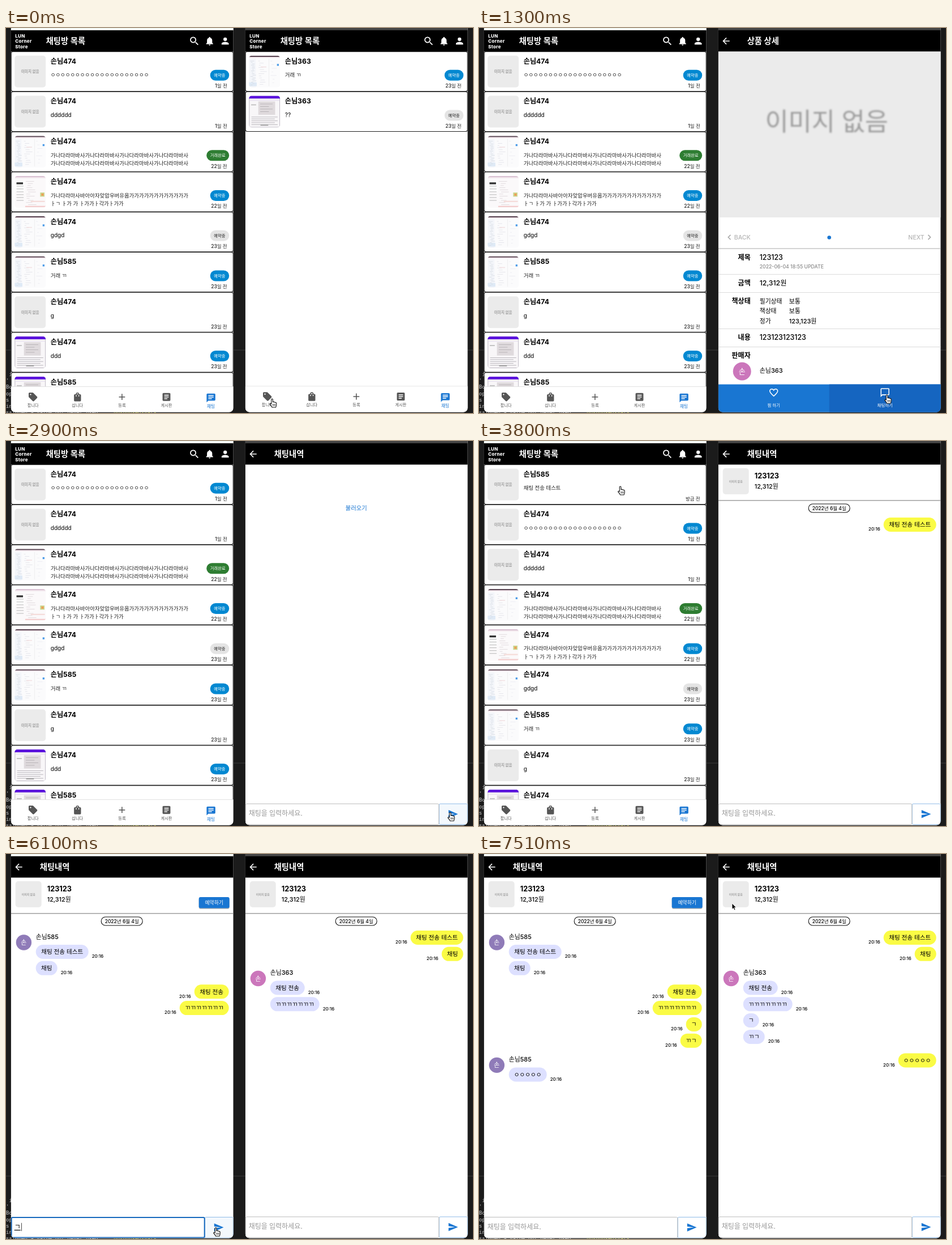
These frames come from a looping animation (825x679 px, 7.61 s). An HTML page:

```html
<!DOCTYPE html>
<html lang="ko">
<head>
<meta charset="utf-8">
<style>
html, body { margin: 0; width: 100%; height: 100%; overflow: hidden; background: #1b1b1b; }
svg { display: block; font-weight: 450; }
text { font-family: Inter, "Noto Sans CJK KR", "Noto Sans CJK", sans-serif; white-space: pre; }
.mono { font-family: "DejaVu Sans Mono", monospace; }
</style>
</head>
<body>
<svg id="stage" width="825" height="679" viewBox="0 0 825 679"></svg>
<script>
const LOOP = 7610, BLUE = '#1976d2', TOP = 41.6;
const BOLD = ' font-weight="700"', MID = ' text-anchor="middle"', END = ' text-anchor="end"';
const fill = c => ` fill="${c}"`;
const text = (x, y, s, size, o = '') => `<text x="${x}" y="${y}" font-size="${size}"${o}>${s}</text>`;
const rect = (x, y, w, h, c, rx = 0, o = '') =>
  `<rect x="${x}" y="${y}" width="${w}" height="${h}" rx="${rx}" fill="${c}" ${o}/>`;
const stroke = (c, w = 1) => `stroke="${c}" stroke-width="${w}"`;
const circle = (x, y, r, c) => `<circle cx="${x}" cy="${y}" r="${r}" fill="${c}"/>`;
const path = (d, o) => `<path d="${d}" ${o}/>`;
const move = (x, y, s) => `<g transform="translate(${x} ${y})">${s}</g>`;
const rowsOf = (n, f) => Array.from({ length: n }, (_, i) => f(i)).join('');

// Icons on a 24 unit grid: [path, stroke width or 0 for filled]
const ICONS = {
  search: ['M14.500 14.500L20 20M15 9.500A5.500 5.500 0 1 1 4 9.500 5.500 5.500 0 0 1 15 9.500Z', 2.1],
  bell: ['M12 22a2 2 0 0 0 2-2h-4a2 2 0 0 0 2 2zM18 16v-5c0-3-1.600-5.600-4.500-6.300V4a1.500 1.500 0 0 0-3 0v.7C7.600 5.400 6 8 6 11v5l-2 2v1h16v-1z', 0],
  person: ['M12 12a4 4 0 1 0 0-8 4 4 0 0 0 0 8zM12 14c-2.700 0-8 1.300-8 4v2h16v-2c0-2.700-5.300-4-8-4z', 0],
  sell: ['M21.400 11.400L12.600 2.600Q12 2 11.200 2H4Q2 2 2 4v7.200q0 .8.6 1.400l8.800 8.800q1.400 1.200 2.800 0l7.200-7.200q1.200-1.400 0-2.800zM6.500 8a1.500 1.500 0 1 1 0-3 1.500 1.500 0 0 1 0 3z', 0],
  bag: ['M18 6h-2a4 4 0 0 0-8 0H6Q4 6 4 8v12q0 2 2 2h12q2 0 2-2V8q0-2-2-2zM10 10q-1 2-2 0V8h2zM12 4q2 0 2 2h-4q0-2 2-2zM16 10q-1 2-2 0V8h2z', 0],
  add: ['M12 5v14M5 12h14', 2],
  board: ['M5 3h14q2 0 2 2v14q0 2-2 2H5q-2 0-2-2V5q0-2 2-2zM7 7v2h10V7zM7 11v2h10v-2zM7 15v2h7v-2z', 0],
  chat: ['M4 2h16q2 0 2 2v12q0 2-2 2H6l-4 4V4q0-2 2-2zM6 5.500v2h12v-2zM6 9v2h12V9zM6 12.500v2h8v-2z', 0],
  bubble: ['M3 20V4q0-1 1-1h16q1 0 1 1v12q0 1-1 1H6z', 2],
  heart: ['M12 20C5 14 3 11.500 3 8.500 3 6 5 4 7.500 4 9.300 4 11 5 12 6.700 13 5 14.700 4 16.500 4 19 4 21 6 21 8.500c0 3-2 5.500-9 11.500z', 2],
  back: ['M20 12H5.500M12.500 4.500L5 12l7.500 7.500', 2],
  left: ['M15 6.500L9.500 12l5.500 5.500', 2.2],
  right: ['M9 6.500l5.500 5.500L9 17.500', 2.2],
  send: ['M2 21L23 12 2 3v7l15 2-15 2z', 0]
};
function icon(name, x, y, size, color) {
  const [d, w] = ICONS[name], k = size / 24;
  const paint = w ? `fill="none" ${stroke(color, w)}` : `fill="${color}" fill-rule="evenodd"`;
  return `<g transform="translate(${x - size / 2} ${y - size / 2}) scale(${k})">${path(d, paint)}</g>`;
}

// Thumbnails in a 100 x 100 box
function noise(seed) {
  return () => (seed = seed * 16807 % 2147483647) / 2147483647;
}
function lines(n, x, w, color, seed) {
  const rnd = noise(seed);
  return rowsOf(n, i => rect(x + rnd() * 8, 16 + i * 80 / n, w * (.2 + .7 * rnd()), 1.6, color));
}
const PICS = {
  code: () => rect(0, 0, 100, 100, '#fbfbfc') + rect(0, 0, 100, 4, '#57424f') + rect(0, 4, 100, 3, '#f0e3e9') +
    rect(0, 10, 22, 90, '#f4f6fa') + rect(0, 84, 25, 12, '#dfeaf6') + lines(18, 4, 15, '#d8dde5', 7) +
    lines(12, 30, 24, '#e4e4ea', 23) + rect(64, 10, 1, 86, '#e4e4e4') + lines(7, 69, 22, '#ececf2', 31) +
    rect(90, 26, 6, 6, '#4b9be8') + rect(38, 34, 18, 3, '#f3e2e4'),
  memo: () => rect(0, 0, 100, 100, '#fbf9fa') + rect(0, 0, 100, 4, '#d9c2d2') + rect(0, 4, 100, 3, '#f1e6ec') +
    rect(3, 18, 28, 32, '#fff') + rect(6, 20, 21, 6, '#333') + rowsOf(6, i => rect(6, 31 + i * 9, 23, 1.5, '#aaa')) +
    lines(12, 36, 40, '#dfd8dc', 5) + rect(82, 52, 14, 13, '#c9d891') + rect(86, 55, 7, 7, '#ef9c55') +
    rect(52, 78, 45, 4, '#f5dcd9') + rect(34, 94, 66, 4, '#f3cccc'),
  form: () => rect(0, 0, 100, 100, '#bdb8c2') + rect(0, 0, 100, 9, '#5b13dd') + rect(2, 9, 96, 89, '#f8f6f8') +
    rect(2, 12, 96, 4, '#ece6f1') + rect(30, 18, 54, 42, '#dfdadd') + rowsOf(4, i => rect(36, 25 + i * 8, 40 - i % 2 * 12, 1.6, '#b5b0b4')) +
    rect(7, 27, 16, 3, '#bbb') + rowsOf(5, i => rect(8, 66 + i * 6, 84 - i % 2 * 9, 1.6, '#b3b0b6')) + rect(37, 91, 25, 3, '#999'),
  dark: () => rect(0, 0, 100, 100, '#1c2c33') + rect(0, 0, 100, 4, '#583777') + rect(0, 4, 100, 3, '#303c43') +
    rect(0, 7, 17, 93, '#17242b') + lines(16, 2, 12, '#2c3c44', 9) + lines(19, 22, 34, '#33494f', 44) +
    lines(12, 65, 26, '#2d444b', 17) + rect(17, 72, 83, 1, '#36484f'),
  cal: () => rect(0, 0, 100, 100, '#fff') + text(3, 11, '2022', 6) + rowsOf(6, i => rect(0, 20 + i * 15, 100, .6, '#e6e6e6')) +
    rowsOf(6, i => rect(14 + i * 14, 15, .6, 85, '#f0f0f0')) + rowsOf(24, i => rect(6 + i % 7 * 14, 24 + (i / 7 | 0) * 17, 3, 2, i % 5 ? '#bbb' : '#8aacd8')) +
    rect(78, 13, 5, 5, '#ef8f8b')
};
const NO_IMAGE = '이미지 없음';
function thumb(kind, x, y, w, h, size) {
  if (!kind) return rect(x, y, w, h, '#ebebeb', 5) +
    text(x + w / 2, y + h / 2 + size * .36, NO_IMAGE, size, BOLD + MID + fill('#a0a0a0'));
  return `<g transform="translate(${x} ${y}) scale(${w / 100} ${h / 100})" style="clip-path:inset(0 round 9px)">${PICS[kind]()}</g>`;
}

function header(title, back) {
  const bar = rect(0, 4, 393, TOP - 4, '#000');
  const name = x => text(x, 28, title, 14.3, fill('#fff') + ' font-weight="600"');
  if (back) return bar + icon('back', 14, 23, 18, '#fff') + name(51);
  return bar + ['LUN', 'Corner', 'Store'].map((s, i) => text(7.5, 16.700 + i * 9.400, s, 8, fill('#fff') + ' font-weight="800" letter-spacing=".3"')).join('') +
    name(62) + icon('search', 324, 23, 20, '#fff') + icon('bell', 351, 23, 18.5, '#fff') + icon('person', 378.5, 23, 19, '#fff');
}

const TABS = [['sell', '팝니다'], ['bag', '삽니다'], ['add', '등록'], ['board', '게시판'], ['chat', '채팅']];
function nav(active, dy) {
  return move(0, dy, rect(0, 632, 393, 1, '#e2e2e2') + rect(0, 633, 393, 50, '#fff') + TABS.map(([name, label], i) => {
    const x = 39 + i * 78.6, on = i === active, c = on ? BLUE : '#555';
    return icon(name, x, on ? 652.5 : 650.7, 18.5, c) + text(x, on ? 669.8 : 667.6, label, on ? 7.7 : 7.2, MID + fill(c));
  }).join(''));
}

const BADGES = { blue: ['예약중', '#0288d1', '#fff'], gray: ['예약중', '#e4e4e4', '#222'], done: ['거래완료', '#2e7d32', '#fff'] };
function badge(kind, right, y) {
  if (!kind) return '';
  const [s, bg, fg] = BADGES[kind], w = kind === 'done' ? 40 : 33.5;
  return rect(right - w, y - 9.5, w, 19, bg, 9.5) + text(right - w / 2, y + 2.7, s, 7.3, MID + fill(fg));
}
const card = (y, h) => rect(.5, y, 392, h - .6, '#fff', 3, stroke('#222', 1.1));

const ANN = '손님363', BEN = '손님474', CAT = '손님585', GA = '가나다라마바사'.repeat(4);
const ROOMS = [
  [BEN, '', ['ㅇ'.repeat(20)], 'blue', '1일 전'],
  [BEN, '', ['dddddd'], '', '1일 전'],
  [BEN, 'code', [GA, GA], 'done', '22일 전'],
  [BEN, 'memo', ['가나다라마사바아아자앚압우버유옵' + '가'.repeat(12), 'ㅏㄱ ㅏ가 가 ㅏ가가ㅏ각가ㅏ가가'], 'blue', '22일 전'],
  [BEN, 'code', ['gdgd'], 'gray', '23일 전'],
  [CAT, 'code', ['거래 ㄲ'], 'blue', '23일 전'],
  [BEN, '', ['g'], '', '23일 전'],
  [BEN, 'form', ['ddd'], 'blue', '23일 전'],
  [CAT, 'form', ['ddd'], 'blue', '23일 전']
];
const NEW_ROOM = [CAT, '', ['채팅 전송 테스트'], '', '방금 전'];
const BUYER_ROOMS = [[ANN, 'code', ['거래 ㄲ'], 'blue', '23일 전'], [ANN, 'form', ['??'], 'gray', '23일 전']];
function roomList(rooms, dy) {
  return rooms.map(([name, pic, msg, tag, when], i) => move(0, TOP + i * 70.75,
    card(0, 70.75) + thumb(pic, 6.5, 7.2, 55, 56, 6.6) + text(70, 21, name, 12.2, BOLD) +
    msg.map((s, j) => text(70, 44.8 + j * 14.5, s, /[a-z?]/.test(s) ? 10 : 9.45, fill('#222'))).join('') +
    badge(tag, 385.5, 41.6) + text(382, 63.6, when, 8.5, END + fill('#222')))).join('') +
    header('채팅방 목록') + nav(4, dy);
}

const ITEMS = [
  ['', ['123123'], '', '12,312원', '1시간 전'],
  ['', ['등록 글 수정 테스트'], '', '10,000원', '2시간 전'],
  ['dark', ['asdasd'], '캡스톤디자인II / 류담혁', '20,000원', '2시간 전'],
  ['cal', ['123123'], '영어회화 / 노아린벨크', '123,123원', '3시간 전'],
  ['dark', ['팝니다 등록 테스트'], '캡스톤디자인II / 류담혁', '20,000원', '3시간 전'],
  ['', ['ㅇ'.repeat(24), 'ㅇ'.repeat(19)], '글로벌비즈니스영어 / 맹솔찬', '21,212원', '22일 전'],
  ['memo', ['이미지도 올리고 수정'], '전공탐색과생애설... / 유키네하루', '2,222원', '22일 전', 'gray']
];
function market(tip) {
  return ITEMS.map(([pic, title, course, price, when, tag], i) => move(0, TOP + i * 85.2,
    card(0, 85.2) + thumb(pic, 4.5, 4.8, 79.5, 76, 10) +
    title.map((s, j) => text(93, 19.1 + j * 16.5, s, 10.9)).join('') +
    (course && rect(89, 47.3, 42, 15, '#e4e4e4', 7.5) + text(110, 57.5, '대학', 7.2, MID) + text(135, 57.9, course, 8.4)) +
    text(93, 76.5, price, 13.8, BOLD) + text(383, 76.8, when, 8.7, END + fill('#666')) +
    icon('heart', 375, 16.8, 19, '#444') + badge(tag, 385, 55))).join('') +
    header('팝니다') + nav(0, -.7) +
    (tip ? rect(0, 660.5, 113, 20, '#202124', 2) + text(4, 672, 'innerhome:4100/unit/27', 9, fill('#ddd')) : '');
}

function detail(hover) {
  const label = (y, s) => text(57, y, s, 12, BOLD + END);
  const rule = (y, c = '#dcdcdc') => rect(0, y, 393, 1, c);
  const action = (x, name, s) => icon(name, x, 643, 18.5, '#fff') + text(x, 667.7, s, 7.4, MID + fill('#fff'));
  const facts = [['필기상태', '보통'], ['책상태', '보통'], ['정가', '123,123원']];
  return header('상품 상세', true) + rect(0, TOP, 393, 334 - TOP, '#ebebeb') +
    text(191.5, 181, NO_IMAGE, 44.7, MID + fill('#9c9c9c') + ' font-weight="500" style="filter:blur(1.6px)"') +
    icon('left', 19.5, 369, 18, '#aaa') + text(28, 372.8, 'BACK', 10.6, fill('#b5b5b5')) +
    icon('right', 373, 369, 18, '#aaa') + text(364, 372.8, 'NEXT', 10.6, END + fill('#b5b5b5')) + circle(196, 369.5, 3.3, BLUE) +
    rule(388.5, '#aaa') + [434, 466, 530, 562].map(y => rule(y)).join('') +
    label(409, '제목') + text(73, 409.3, '123123', 12.4) + text(73, 423.7, '2022-06-04 18:55 UPDATE', 8.7, fill('#888')) +
    label(454, '금액') + text(73, 454, '12,312원', 12.3) + label(486, '책상태') +
    facts.map(([k, v], i) => text(73, 486 + i * 17.3, k, 10.8) + text(125, 486 + i * 17.3, v, 11)).join('') +
    label(549.7, '내용') + text(73, 549.9, '123123123123', 12.4) + label(582, '판매자') +
    circle(42, 605.5, 16, '#cb76bb') + text(42, 610, '손', 13, MID + fill('#fff')) + text(73, 608, ANN, 11) +
    rect(0, 628.5, 393, 50, BLUE) + rect(196, 628.5, 197, 50, hover ? '#1565c0' : BLUE) +
    action(98, 'heart', '찜 하기') + action(294.5, 'bubble', '채팅하기');
}

// Sides: 0 is the left panel (seller), 1 the right panel (buyer).
const MESSAGES = [ // side, text, bubble width, typing starts, sent, arrives
  [1, '채팅 전송 테스트', 93, 1700, 2800, 3000],
  [1, '채팅', 38, 4300, 4500, 4500],
  [0, '채팅 전송', 61, 4900, 5400, 5400],
  [0, 'ㄲ'.repeat(7), 87, 5500, 5900, 5900],
  [0, 'ㄱ', 28, 6100, 6300, 6300],
  [0, 'ㄲㄱ', 38, 6400, 6600, 6600],
  [1, 'ㅇ'.repeat(5), 67, 6900, 7100, 7100]
];
const FOCUS = [[[4800, 6700]], [[1600, 2800], [4200, 4500], [6800, 7100]]];
const HOVER = [[[5400, 6700]], [[2700, 3300], [4500, 4900], [7100, 7200]]];
const within = (t, spans) => spans.some(([a, b]) => t >= a && t < b);

function inputBar(t, side) {
  const draft = MESSAGES.find(m => m[0] === side && t >= m[3] && t < m[4]);
  const focus = within(t, FOCUS[side]);
  let line = text(6, 661.8, '채팅을 입력하세요.', 12, fill('#999'));
  if (draft) {
    const [, s, , from, to] = draft;
    const n = Math.min(s.length, Math.ceil(s.length * (t - from + 100) / (to - from) / .7));
    line = text(6, 661.8, `${s.slice(0, n - 1)}<tspan text-decoration="underline">${s[n - 1]}</tspan><tspan font-weight="300">|</tspan>`, 12);
  }
  return move(0, side ? -.6 : 0, rect(0, 640, 393, 40, '#fff') +
    rect(342.5, 640.5, 50, 36.5, within(t, HOVER[side]) ? '#f3f8fd' : '#fff', 2, stroke('#8fbbe8')) +
    (focus ? rect(1, 641, 341, 35.5, '#fff', 2, stroke('#1769bd', 2)) : rect(.5, 640.5, 341.5, 36.5, '#fff', 2, stroke('#bbb'))) +
    line + icon('send', 367, 658.5, 19, BLUE));
}

function conversation(t, side) {
  let y = 0, last = -1, out = '';
  for (const [from, s, w, , , at] of MESSAGES) {
    if (t < at) break;
    const mine = from === side;
    y = last < 0 ? (mine ? 135 : 160) : y + (from === last ? 28.8 : mine ? 41.5 : 59.7);
    if (!mine && from !== last) out += circle(22.7, y - 4, 13.7, side ? '#cb76bb' : '#8f7bb8') +
      text(22.7, y, '손', 11, MID + fill('#fff')) + text(44, y - 10.3, side ? ANN : CAT, 10.9);
    const x = mine ? 385 - w : 44;
    out += rect(x, y, w, 25, mine ? '#fafb45' : '#dde0ff', 12.5) + text(x + w / 2, y + 16.3, s, 10.6, MID) +
      text(mine ? x - 6 : x + w + 6, y + 23.2, '20:16', 7.9, mine ? END : '');
    last = from;
  }
  return out;
}

function chatRoom(t, side) {
  let body = text(196, 122, '불러오기', 10.3, MID + fill(BLUE));
  if (t >= 3000) {
    body = thumb('', 8, 48, 46, 46, 5) + text(64, 65.5, '123123', 12.7, BOLD) + text(64, 84, '12,312원', 10.8) +
      rect(0, 104.3, 393, 1.2, '#888') + rect(159.5, 111, 73, 15, '#fff', 7.5, stroke('#111', 1.1)) +
      text(196, 121.8, '2022년 6월 4일', 8.5, MID) + conversation(t, side);
    if (!side) body += rect(332, 77.5, 54, 19.5, '#bbb', 3) + rect(332, 76, 54, 19.5, BLUE, 3) + text(359, 88.7, '예약하기', 8.8, MID + fill('#fff'));
  }
  return header('채팅내역', true) + body + inputBar(t, side);
}

const TRACK = [ // time, x, y
  [0, 470.5, 654], [100, 470.5, 654], [700, 581.5, 74], [900, 581.5, 74], [1200, 721, 647], [1400, 721, 647],
  [1600, 540, 652], [2500, 560, 655], [2700, 785, 655], [3300, 785, 655], [3700, 250, 80], [3900, 250, 80],
  [4200, 560, 655], [4400, 700, 655], [4500, 785, 655], [4700, 287.5, 654], [4900, 287.5, 654], [5400, 371, 659],
  [6600, 371, 659], [6800, 560, 655], [7000, 560, 655], [7100, 785, 655], [7200, 766, 468], [7510, 447, 87]
];
const HIDDEN = [[1700, 2500], [4900, 5400], [6900, 7100]], ARROW = [[3400, 3700], [4600, 4900], [7200, LOOP]];
function cursor(t) {
  if (within(t, HIDDEN)) return '';
  const i = Math.max(1, TRACK.findIndex(k => k[0] >= t));
  const [t0, x0, y0] = TRACK[i - 1], [t1, x1, y1] = TRACK[i], k = (t - t0) / (t1 - t0);
  const shape = within(t, ARROW)
    ? path('M0 0V10.500L2.400 8.300 4 12 5.900 11.200 4.300 7.600H7.400Z', `fill="#000" ${stroke('#fff', .8)}`)
    : path('M-1.700 9V1Q-.4-1 .9 1V5.500Q2.300 4.600 3.200 6 4.600 5.300 5.500 6.700 7 6.200 7.200 8V11Q7 13 6 15H-.5Q-1.500 12.500-4.300 9.500-4 7.300-1.700 9Z', `fill="#fff" ${stroke('#111', 1.1)}`) +
      path('M1 9v3.500M3 9v3.500M5 9v3.500', stroke('#111', .8));
  return move(x0 + (x1 - x0) * k, y0 + (y1 - y0) * k, shape);
}

const TERMINAL = [' i', "'", 'Bo', 'op', 's', 'in', 'ssigned a value but never used'];
const BACKDROP = `<defs><clipPath id="panel"><rect y="-20" width="393" height="697.5" rx="8"/></clipPath></defs>` +
  rect(0, 0, 825, 679, '#1b1b1b') + rect(0, 567.5, 825, 1, '#3c3c3c') +
  TERMINAL.map((s, i) => text(0, 614 + i * 11.2, s, 9, ' class="mono"' + fill('#c8c8c8'))).join('') +
  text(190, 681, 'no-unused-vars', 9, ' class="mono"' + fill('#b9bb3c'));
const panel = (x, strip, body) => move(x, 0, `<g clip-path="url(#panel)">${rect(0, 0, 393, 679, '#fff')}${rect(0, 0, 393, 4, strip)}${body}</g>`);

function scene(t) {
  const left = t >= 3900 ? chatRoom(t, 0) : roomList(t >= 3500 ? [NEW_ROOM, ...ROOMS] : ROOMS, 0);
  const right = t < 200 ? roomList(BUYER_ROOMS, -.7) : t < 1000 ? market(t >= 500) : t < 1400 ? detail(t >= 1200) : chatRoom(t, 1);
  return BACKDROP + panel(8.7, '#f7fdf8', left) + panel(422.7, '#444', right) + cursor(t);
}

const stage = document.getElementById('stage');
let shown = -1;
function frame() {
  const now = performance.now() % LOOP;
  const t = now >= 7510 ? 7510 : Math.min(7400, Math.floor(now / 100) * 100);
  if (t !== shown) stage.innerHTML = scene(shown = t);
  requestAnimationFrame(frame);
}
frame();
</script>
</body>
</html>
```
